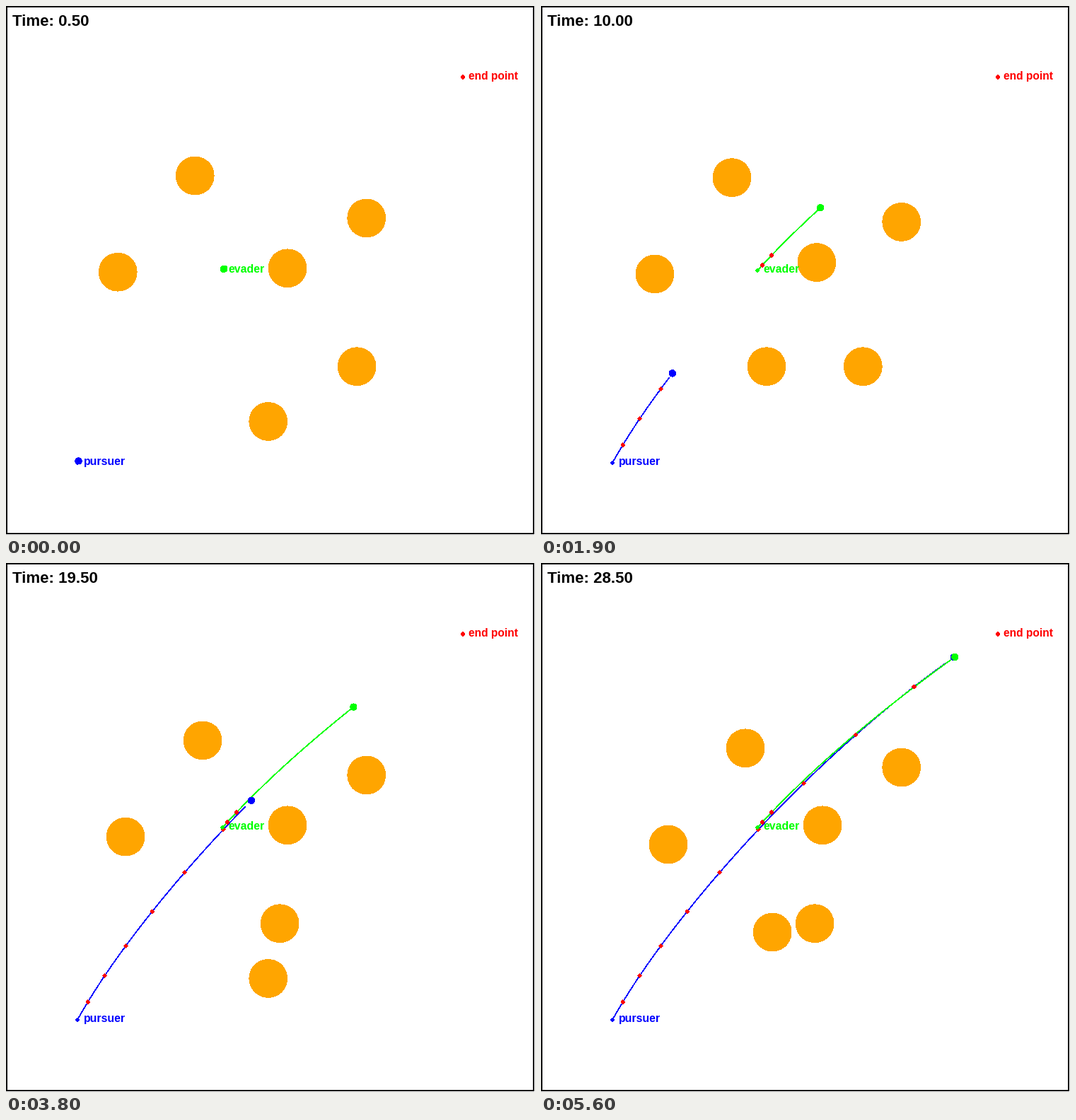
Write a matplotlib script that moves like this. It is 748 px wide and 748 px high and loops after 5700 ms.

```python
import numpy as np
import matplotlib.pyplot as plt
from matplotlib.animation import FuncAnimation
from matplotlib.patches import Circle, Rectangle, RegularPolygon

SIZE, DPI = 748, 100
PX = 72 / DPI
FRAMES, STEP = 57, 0.5
UNIT, OX, OY = 27.25, 101, 646      # world to screen
LAG = 0.4                           # the trail stays behind the body
REST = 0.3                          # soft start of each agent
ORANGE, LIME, BLUE, RED = "#ffa500", "#00ff00", "#0000ff", "#ff0000"

fig = plt.figure(figsize=(SIZE / DPI, SIZE / DPI), dpi=DPI, facecolor="white")
ax = fig.add_axes([0, 0, 1, 1])
ax.set(xlim=(0, SIZE), ylim=(SIZE, 0))
ax.axis("off")


def label(x, y, text, color, px):
    return ax.text(x, y, text, color=color, fontsize=px * PX,
                   family="Liberation Sans", weight="bold",
                   ha="left", va="baseline", zorder=6)


def disc(r, color, z):
    return ax.add_patch(Circle((-99, -99), r, fc=color, lw=0, zorder=z, aa=False))


def diamond(x, y, color):
    return ax.add_patch(RegularPolygon((x, y), 4, radius=2.7, fc=color,
                                       lw=0, zorder=4, aa=False))


def soft(t):
    return t - REST * (1 - np.exp(-t / REST))


class Agent:
    """Body on a smooth curve near its key points, with trail and marks."""

    def __init__(self, keys, degree, color, every, count, z):
        t, x, y = np.array(keys).T
        self.fx, self.fy = (np.polyfit(soft(t), v, degree) for v in (x, y))
        self.line, = ax.plot([], [], color=color, lw=0.5 * PX,
                             zorder=z, antialiased=False)
        self.body = disc(4.6, color, z + 3)
        diamond(x[0], y[0], color)
        self.marks = [(s, diamond(*self.at(s - LAG), RED))
                      for s in every * np.arange(1, count + 1)]

    def at(self, t):
        return np.polyval(self.fx, soft(t)), np.polyval(self.fy, soft(t))

    def update(self, t):
        self.body.center = self.at(t)
        self.line.set_data(*self.at(np.arange(STEP, t + 0.1, STEP) - LAG * (t > STEP)))
        for shown, mark in self.marks:
            mark.set_visible(t >= shown)


class Obstacle:
    """Disc going back and forth: start, move per step, steps one way."""

    def __init__(self, start, move, span):
        self.start, self.move, self.span = np.array(start), np.array(move), span
        self.patch = disc(26.8, ORANGE, 1)

    def update(self, n):
        k = self.span - abs(n % (2 * self.span) - self.span)
        x, y = self.start + k * self.move
        self.patch.center = OX + UNIT * x, OY - UNIT * y


ax.add_patch(Rectangle((1, 1), SIZE - 3, SIZE - 3, fill=False, ec="black",
                       lw=2 * PX, zorder=7, aa=False))

obstacles = [
    Obstacle((6, 15), (0.1, -0.1), 11),
    Obstacle((2, 10), (0.1, -0.1), 11),
    Obstacle((11, 10), (-0.1, 0.1), 4),
    Obstacle((15, 12.5), (0, 0.2), 10),
    Obstacle((15, 5), (-0.5, 0), 12),
    Obstacle((10, 2), (-0.1, 0.15), 20),
]

# key points: time, x, y
pursuer = Agent([(0, 101, 646), (7.5, 157, 558.3), (13, 229, 465.5),
                 (17, 293.5, 392), (21.5, 393.5, 290), (28.5, 583.8, 133.5)],
                4, BLUE, every=3, count=9, z=2)
evader = Agent([(0, 306, 374), (7.5, 371, 307.8), (17, 465.5, 224.5),
                (28.5, 585.3, 132.8)],
               3, LIME, every=1.5, count=2, z=2.5)

diamond(646, 100.5, RED)
label(109.5, 649, "pursuer", BLUE, 15.9)
label(314.5, 377, "evader", LIME, 15.9)
label(654.5, 104, "end point", RED, 15.5)
clock = label(9.5, 28, "", "black", 22.3)


def draw(i):
    t = STEP * (i + 1)
    clock.set_text(f"Time: {t:.2f}")
    for ob in obstacles:
        ob.update(i + 1)
    for agent in (pursuer, evader):
        agent.update(t)
    return []


anim = FuncAnimation(fig, draw, frames=FRAMES, interval=100,
                     repeat=True, repeat_delay=0, blit=False)
plt.show()
```
